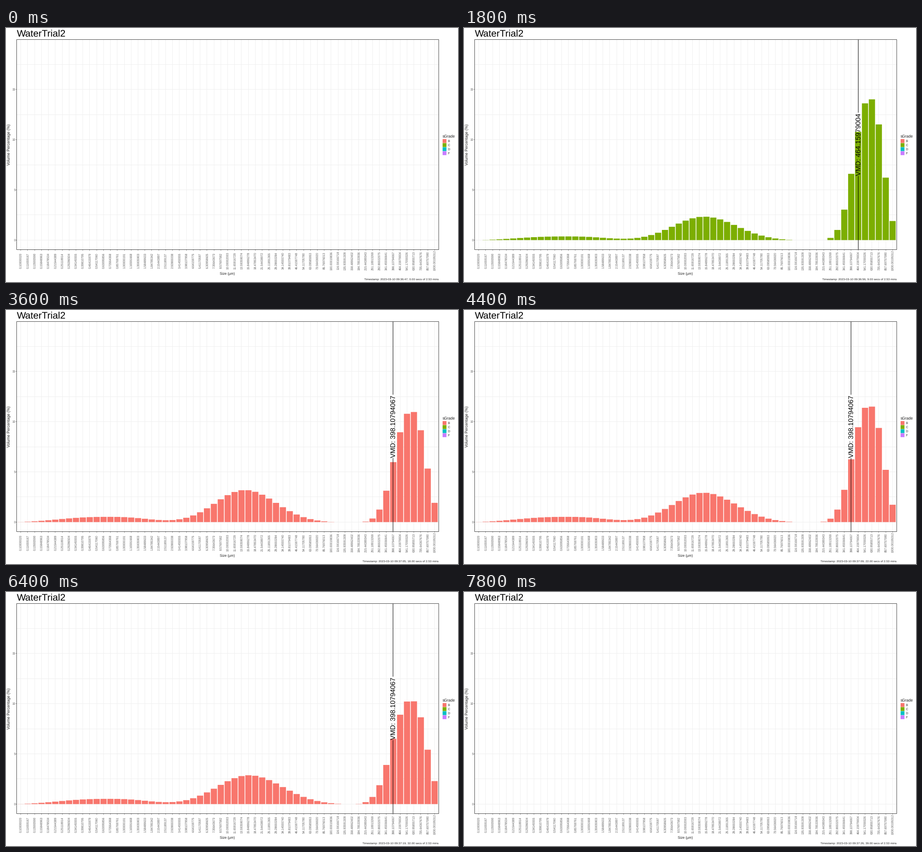
A matplotlib script for the animation above (8 s loop, 998 px wide and 561 px high).

```python
import numpy as np
import matplotlib.pyplot as plt
from matplotlib.animation import FuncAnimation
from matplotlib.patches import Rectangle

W, H, DPI = 998, 561, 64
FRAMES, STEP_MS = 40, 200
LEFT, RIGHT, TOP, BOTTOM = 23.5, 955.5, 25.5, 489.5
BIN = (RIGHT - LEFT) / 61.2
ZERO, UNIT = 468.4, 22.18
GRADES = {"B": "#F8766D", "C": "#7CAE00", "D": "#00BFC4", "F": "#C77CFF"}

plt.rcParams["font.family"] = "Liberation Sans"
plt.rcParams["text.hinting"] = "none"

# Size classes: 15 per decade, single precision
bins = np.arange(61)
sizes = np.float32((1 + 1.96e-6) * 10 ** (bins / 15 - 1))
names = [f"{s:.8f}" for s in sizes]

# Second: fine height, then height, centre and width of the middle
# and of the coarse mode
KEYS = {
    4: (.39, 1.62, 32.8, 6.4, 17.1, 56.8, 2.8),
    13: (.43, 2.99, 32.6, 6.25, 11.8, 56.55, 3.2),
    18: (.57, 3.24, 32.5, 6.05, 11.1, 56.6, 3.25),
    27: (.57, 2.64, 32.7, 6.6, 12.4, 56.5, 3.1),
    32: (.57, 2.92, 33.1, 6.5, 10.4, 56.5, 3.55),
}


def mode(height, centre, left, right, powers=(2, 2)):
    """Bell curve with its own width and steepness on each side."""
    d = bins - centre
    fall = np.where(d < 0, (abs(d) / left) ** powers[0],
                    (abs(d) / right) ** powers[1])
    return height * np.exp(-fall)


def heights(sec):
    params = [np.interp(sec, list(KEYS), p) for p in zip(*KEYS.values())]
    fine, mid_h, mid_c, mid_w, big_h, big_c, big_w = params
    total = (mode(fine, 12.8, 9.2, 7.25, (2.5, 2.5))
             + mode(mid_h, mid_c, mid_w, 1.05 * mid_w)
             + mode(big_h, big_c, big_w, .84 * big_w, (2.2, 2.5)))
    return np.maximum(total - .05, 0)


def median_bin(values):
    """Largest class with at least half of the volume at or above it."""
    above = np.cumsum(values[::-1])[::-1]
    return bins[above >= 50].max()


def bin_x(i):
    return LEFT + (i + .6) * BIN


def pixel(v):
    return np.floor(v) + .5


def pt(px):
    return px * 72 / DPI


fig = plt.figure(figsize=(W / DPI, H / DPI), dpi=DPI, facecolor="white")
ax = fig.add_axes([0, 0, 1, 1])
ax.set_xlim(0, W)
ax.set_ylim(H, 0)
ax.axis("off")


def label(x, y, s, px, color="black", **kw):
    return ax.text(x, y, s, fontsize=pt(px), color=color, **kw)


def upright(x, y, s, px, color="black", **kw):
    return label(x, y, s, px, color, rotation=90, ha="center", va="center", **kw)


def line(xs, ys, color, px=1, z=1):
    return ax.plot(xs, ys, color=color, lw=pt(px), zorder=z, snap=False,
                   solid_capstyle="butt")[0]


# Grid, ticks and axis text
for v in np.arange(0, 17.6, 2.5):
    y = pixel(ZERO - v * UNIT)
    line([LEFT, RIGHT], [y, y], "#EFEFEF")
    if v % 5 == 0:
        line([LEFT - 2, LEFT], [y, y], "#555555", .8)
        label(21, y + 2.4, f"{v:.0f}", 6.6, "#5A5A5A", ha="right")
for i, name in enumerate(names):
    x = pixel(bin_x(i))
    line([x, x], [TOP, BOTTOM], "#EFEFEF")
    line([x, x], [BOTTOM, BOTTOM + 2], "#555555", .8)
    upright(bin_x(i) + .6, 513.8, name, 6.5, "#5A5A5A")
ax.add_patch(Rectangle((LEFT, TOP), RIGHT - LEFT, BOTTOM - TOP, fill=False,
                       ec="#4A4A4A", lw=pt(1), zorder=5, snap=False))

label(23.5, 19, "WaterTrial2", 21.3)
label(489, 545.5, "Size (µm)", 7.7, "#222222", ha="center")
upright(7, 257, "Volume Percentage (%)", 8.65, "#222222")

# Legend
label(964, 242, "sGrade", 8.5, "#222222")
for n, (grade, color) in enumerate(GRADES.items()):
    y = 245.3 + 9 * n
    ax.add_patch(Rectangle((964, y), 8.5, 8.5, fc=color, lw=0, snap=False))
    label(975.5, y + 7, grade, 6.5, "#222222")

# Moving parts
bars = [ax.add_patch(Rectangle((bin_x(i) - .45 * BIN, ZERO), .9 * BIN, 0,
                               lw=0, zorder=2, snap=False)) for i in bins]
marks = [line([0, 0], ys, "black", 1, 3) for ys in ((TOP, 187), (327, BOTTOM))]
vmd = upright(0, 257, "", 15.05, zorder=4)
stamp = label(955.5, 556.3, "", 6.47, "#222222", ha="right")


def draw(sec):
    clock = 36 * 60 + 47 + sec
    stamp.set_text(f"Timestamp: 2023-03-10 09:{clock // 60}:{clock % 60:02d}, "
                   f"{sec:.2f} secs of 2.53 mins")
    active = 0 < sec < FRAMES - 1
    for part in (*bars, *marks, vmd):
        part.set_visible(active)
    if active:
        color = GRADES["C" if sec < 16 else "B"]
        values = heights(sec)
        for bar, v in zip(bars, values):
            bar.set_height(-v * UNIT)
            bar.set_facecolor(color)
        mid = median_bin(values)
        x = pixel(bin_x(mid))
        for mark in marks:
            mark.set_xdata([x, x])
        vmd.set_x(x + 1)
        vmd.set_text(f"VMD: {names[mid]}")
    return [*bars, *marks, vmd, stamp]


anim = FuncAnimation(fig, draw, frames=FRAMES, interval=STEP_MS,
                     init_func=lambda: draw(0), repeat=True, repeat_delay=0)
plt.show()
```
